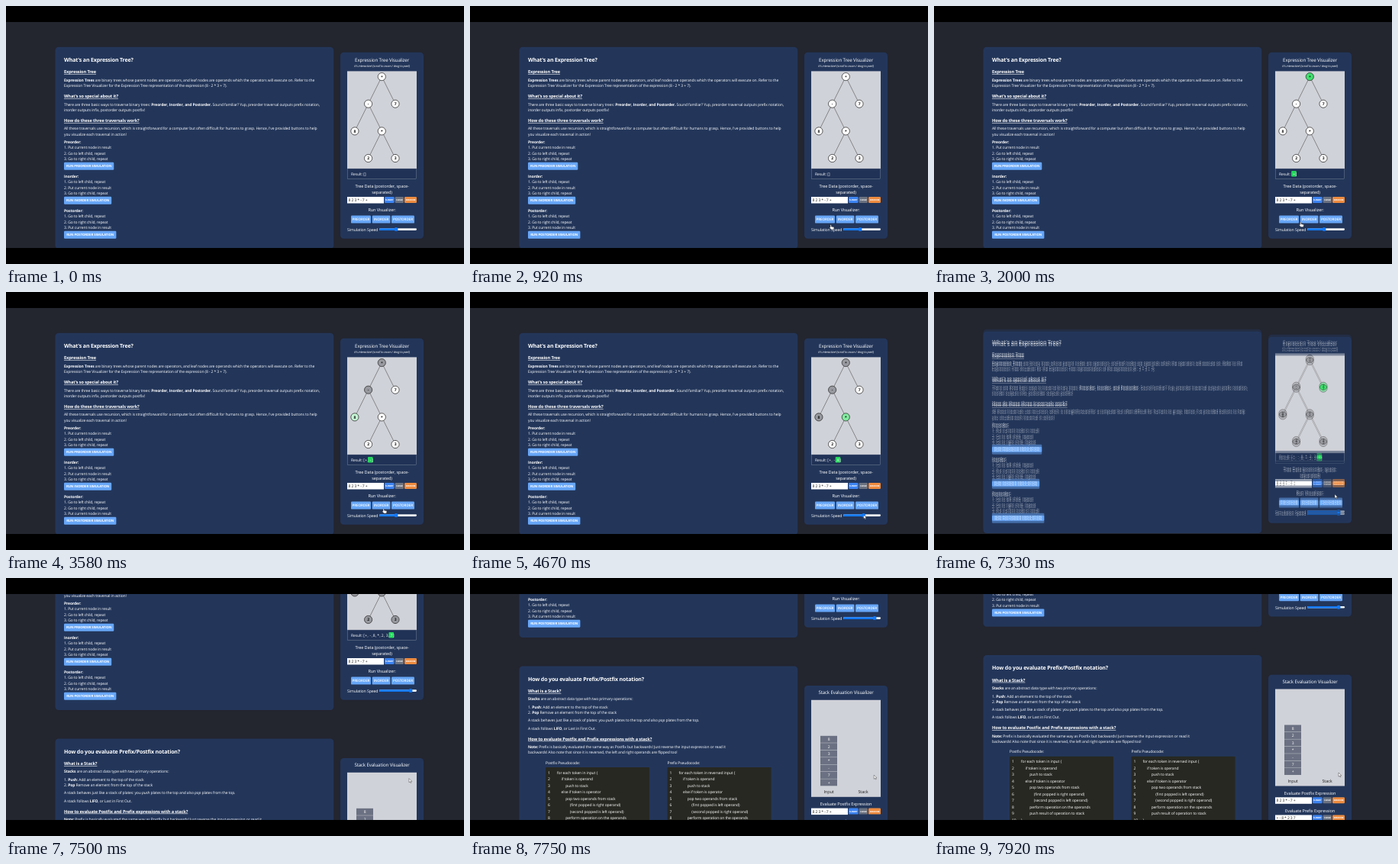
These frames come from a looping animation (600x338 px, 8000 ms). An HTML page:

```html
<!DOCTYPE html>
<html lang="en">
<head>
<meta charset="utf-8">
<title>Expression Tree Visualizer</title>
<style>
html, body { margin: 0; width: 100%; height: 100%; overflow: hidden; background: #000; }
svg { display: block; width: 600px; height: 338px; }
text { font-family: "Open Sans", "Noto Sans", sans-serif; font-size: 5px; letter-spacing: -.022em; fill: #fff; text-rendering: geometricPrecision; white-space: pre; }
.b { font-weight: 700; }
.i { font-style: italic; }
.mid { text-anchor: middle; }
.title { font-size: 7.05px; font-weight: 700; }
.head { font-size: 5.65px; font-weight: 700; text-decoration: underline; }
.panel { font-size: 6.2px; }
.label { font-size: 5.6px; }
.speed { font-size: 5.2px; }
.hint { font-size: 3.95px; font-style: italic; }
.run { font-size: 4.3px; font-weight: 700; }
.mode { font-size: 4.6px; font-weight: 600; }
.tiny { font-size: 2.8px; font-weight: 700; }
.dark { fill: #222; }
.node { font-weight: 700; fill: #111; }
.card { fill: #23365a; }
</style>
</head>
<body>
<svg viewBox="0 0 600 338">
  <defs><clipPath id="view"><rect y="21" width="600" height="296"/></clipPath></defs>
  <rect width="600" height="338"/>
  <g clip-path="url(#view)">
    <rect y="21" width="600" height="296" fill="#23252f"/>
    <g id="scroller"><g id="page"></g></g>
    <use id="ghost" href="#page" opacity=".5" visibility="hidden"/>
    <g id="cursor" stroke="#222" stroke-width=".4" fill="#fff" stroke-linejoin="round">
      <path id="arrow" d="M0 0V5.2L1.3 4.1L2.1 5.9L3 5.5L2.2 3.8H3.8Z"/>
      <path id="hand" d="M0 .5Q.7 -.4 1.3 .5V2.6L4.4 3.2Q5 3.4 4.9 4.3L4.3 6.6H1.2L-1.2 3.9Q-1.2 3 0 3.8Z"/>
    </g>
  </g>
</svg>
<script>
const LOOP = 8000, STEP = 1000 / 12;
const $ = id => document.getElementById(id);
const BLUE = '#67a6f7';

// All text is placed by its vertical centre.
const sizes = { title: 7.05, panel: 6.2, head: 5.65, label: 5.6, speed: 5.2, hint: 3.95, run: 4.3, mode: 4.6, tiny: 2.8 };
function text(x, y, str, cls = '') {
  const size = sizes[cls.split(' ')[0]] || 5;
  return `<text x="${x}" y="${y + size * .35}" class="${cls}">${str}</text>`;
}
const rect = (x, y, w, h, fill, r = 0, extra = '') =>
  `<rect x="${x}" y="${y}" width="${w}" height="${h}" rx="${r}" fill="${fill}" ${extra}/>`;
const card = (x, y, w, h) => `<rect class="card" x="${x}" y="${y}" width="${w}" height="${h}" rx="4.5"/>`;
const button = (x, y, w, h, str, cls, fill = BLUE) =>
  rect(x, y, w, h, fill, 1.2) + text(x + w / 2, y + h / 2, str, cls + ' mid');
const bold = s => `<tspan class="b">${s}</tspan>`;
const ital = s => `<tspan class="i">${s}</tspan>`;
const lines = rows => rows.map(([y, str, cls]) => text(76, y, str, cls)).join('');

function traversal(y, name, order, width) {
  return text(76, y, name + ':', 'b') +
    order.map((s, i) => text(76, y + 7.4 * (i + 1), `${i + 1}. ${s}`)).join('') +
    button(76, y + 26.8, width, 10, `RUN ${name.toUpperCase()} SIMULATION`, 'run');
}

function inputRow(y, value) {
  return rect(447, y, 48, 8.5, '#fff') + text(448.5, y + 4.2, value, 'dark') +
    button(496, y, 12.6, 8, 'SUBMIT', 'tiny', '#3d84f2') +
    button(509.6, y, 11.4, 8, 'CLEAR', 'tiny', '#6b7280') +
    button(522, y, 16, 8, 'RANDOM', 'tiny', '#ee8b3f');
}

function pseudocode(x, input, first, second) {
  const code = [[0, `for each token in ${input} {`], [1, 'if token is operand'], [2, 'push to stack'],
    [1, 'else if token is operator'], [2, 'pop two operands from stack'],
    [3, `(first popped is ${first} operand)`], [3, `(second popped is ${second} operand)`],
    [2, 'perform operation on the operands'], [2, 'push result of operation to stack'], [0, '}']];
  return rect(x, 488, 136, 96, '#272822', 1) + code.map(([depth, str], i) =>
    text(x + 3, 495 + 8.5 * i, i + 1) + text(x + 15 + 5.6 * depth, 495 + 8.5 * i, str)).join('');
}

// Nodes in preorder: symbol, position, parent, time of visit, place in the result.
const nodes = [
  ['+', 492.3, 92.6, -1, 1500, 471.5], ['-', 474.6, 128.2, 0, 2500, 477.3],
  ['8', 456.9, 163.9, 1, 3500, 482], ['*', 492.3, 163.9, 1, 4500, 487.6],
  ['2', 474.6, 199.5, 3, 5250, 493], ['3', 510, 199.5, 3, 5700, 499],
  ['7', 510, 128.2, 0, 6150, 504.8]];

const treeLines = nodes.map(([, x, y, parent]) => parent < 0 ? '' :
  `<path d="M${nodes[parent][1]} ${nodes[parent][2]}L${x} ${y}" stroke="#444" stroke-width=".55"/>`).join('');
const treeNodes = nodes.map(([symbol, x, y], i) =>
  `<circle id="node${i}" cx="${x}" cy="${y}" r="5.1" stroke="#2a2a2a" stroke-width=".75"/>` +
  text(x, y, symbol, 'node mid')).join('');
const resultItems = nodes.map(([symbol, , , , , x], i) =>
  `<g id="item${i}">${text(x, 220, symbol, 'mid')}<g id="comma${i}">${text(x + 2, 220, ',')}</g></g>`).join('');

const intro = card(64.5, 53.8, 364.7, 264.2) + lines([
  [70.9, 'What\'s an Expression Tree?', 'title'],
  [86, 'Expression Tree', 'head'],
  [97, bold('Expression Trees') + ' are binary trees whose parent nodes are operators, and leaf nodes are operands which the operators will execute on. Refer to the'],
  [104.2, 'Expression Tree Visualizer for the Expression Tree representation of the expression (8 - 2 * 3 + 7).'],
  [118, 'What\'s so special about it?', 'head'],
  [128.8, 'There are three basic ways to traverse binary trees: ' + bold('Preorder, Inorder, and Postorder.') + ' Sound familiar? Yup, preorder traversal outputs prefix notation,'],
  [136, 'inorder outputs infix, postorder outputs postfix!'],
  [150, 'How do these three traversals work?', 'head'],
  [160.7, 'All these traversals use recursion, which is straightforward for a computer but often difficult for humans to grasp. Hence, I\'ve provided buttons to help'],
  [168, 'you visualize each traversal in action!']]) +
  traversal(178, 'Preorder', ['Put current node in result', 'Go to left child, repeat', 'Go to right child, repeat'], 65.3) +
  traversal(223, 'Inorder', ['Go to left child, repeat', 'Put current node in result', 'Go to right child, repeat'], 62.2) +
  traversal(268, 'Postorder', ['Go to left child, repeat', 'Go to right child, repeat', 'Put current node in result'], 68.4);

const treePanel = card(438, 60.8, 109, 244) +
  text(492.6, 70.7, 'Expression Tree Visualizer', 'panel mid') +
  text(492.6, 78.4, 'It\'s interactive! (scroll to zoom / drag to pan!)', 'hint mid') +
  rect(447, 85.4, 91, 127.6, '#d0d2d9') + treeLines + treeNodes +
  rect(447.2, 213, 90.6, 13.6, '#203256', 0, 'stroke="#8e98a9" stroke-width=".4"') +
  text(452, 220, 'Result: [') + rect(0, 216, 6.6, 7.6, '#22d65b', 1, 'id="mark"') + resultItems +
  `<g id="close">${text(0, 220, ']')}</g>` +
  text(492.6, 235.7, 'Tree Data (postorder, space-', 'label mid') + text(492.6, 244, 'separated)', 'label mid') +
  inputRow(250, '8 2 3 * - 7 +') +
  text(492.6, 267.3, 'Run Visualizer:', 'label mid') +
  button(452, 274.6, 26, 10, 'PREORDER', 'mode') + button(479.7, 274.6, 23.8, 10, 'INORDER', 'mode') +
  button(505, 274.6, 30, 10, 'POSTORDER', 'mode') +
  text(447, 293, 'Simulation Speed', 'speed') +
  rect(489, 291.3, 49, 2.6, '#f1f3f5', 1.3) + rect(489, 291.3, 22, 2.6, '#1479f5', 1.3, 'id="fill"') +
  '<circle id="thumb" cy="292.6" r="2.5" fill="#1479f5"/>';

const stackText = card(64.5, 355.4, 364.7, 300) + lines([
  [372.2, 'How do you evaluate Prefix/Postfix notation?', 'title'],
  [388, 'What is a Stack?', 'head'],
  [398.7, bold('Stacks') + ' are an abstract data type with two primary operations:'],
  [409.2, '1. ' + bold('Push') + ': Add an element to the top of the stack'],
  [416.6, '2. ' + bold('Pop') + ' Remove an element from the top of the stack'],
  [426.6, `A stack behaves just like a stack of plates: you ${ital('push')} plates to the top and also ${ital('pop')} plates from the top.`],
  [437, 'A stack follows ' + bold('LIFO') + ', or Last in First Out.'],
  [450.6, 'How to evaluate Postfix and Prefix expressions with a stack?', 'head'],
  [461.2, bold('Note:') + ' Prefix is basically evaluated the same way as Postfix but backwards! Just reverse the input expression or read it'],
  [468.5, 'backwards! Also note that since it is reversed, the left and right operands are flipped too!']]) +
  text(99, 481.8, 'Postfix Pseudocode:') + text(258.5, 481.8, 'Prefix Pseudocode:') +
  pseudocode(99, 'input', 'right', 'left') + pseudocode(258.5, 'reversed input', 'left', 'right');

const stackPanel = card(438, 381, 109, 300) +
  text(492.6, 390.2, 'Stack Evaluation Visualizer', 'panel mid') +
  rect(447, 399.8, 91, 127, '#d0d2d9') +
  [...'823*-7+'].map((c, i) => rect(459, 446.8 + 9.42 * i, 22, 9, '#6b7182') +
    text(470, 451.4 + 9.42 * i, c, 'mid')).join('') +
  text(470, 520, 'Input', 'label mid dark') + text(515, 520, 'Stack', 'label mid dark') +
  text(492.6, 536, 'Evaluate Postfix Expression', 'label mid') + inputRow(541.6, '8 2 3 * - 7 +') +
  text(492.6, 559.2, 'Evaluate Prefix Expression', 'label mid') + inputRow(564.8, '+ - 8 * 2 3 7');

$('page').innerHTML = intro + treePanel + stackText + stackPanel;

// Tracks of [time, value, ...], joined by straight lines.
const scrollTrack = [[7250, 0], [7330, 2], [7420, 70], [7500, 145], [7580, 190], [7670, 222], [7750, 240], [7830, 249.5], [7920, 254.3]];
const speedTrack = [[4500, 511], [5200, 530]];
const cursorTrack = [[160, 505, 322], [800, 476, 290], [1100, 466, 281], [1500, 468, 281], [2000, 479.5, 283],
  [3580, 494, 283.5], [4300, 511, 292], [4500, 511, 292], [5200, 530, 292], [5830, 526.5, 298.8],
  [7330, 525, 265], [7500, 528, 262.6], [7920, 530, 255]];

const clamp = v => Math.max(0, Math.min(1, v));
function sample(track, t) {
  const i = track.findIndex(key => key[0] > t);
  if (i === 0) return track[0].slice(1);
  if (i < 0) return track[track.length - 1].slice(1);
  const a = track[i - 1], b = track[i], p = (t - a[0]) / (b[0] - a[0]);
  return a.slice(1).map((v, k) => v + (b[k + 1] - v) * p);
}
const mix = (a, b, p) => `rgb(${a.map((v, k) => Math.round(v + (b[k] - v) * p))})`;
const show = (id, on) => $(id).setAttribute('visibility', on ? 'inherit' : 'hidden');
const move = (id, x, y) => $(id).setAttribute('transform', `translate(${x} ${y})`);
const WHITE = [255, 255, 255], GREEN = [62, 224, 108], GRAY = [151, 153, 159];

function draw(t) {
  let last = -1;
  nodes.forEach(([, , , , start], i) => {
    const next = nodes[i + 1] ? nodes[i + 1][4] : Infinity;
    const color = t < next - 100 ? mix(WHITE, GREEN, clamp((t - start) / 260))
      : mix(GREEN, GRAY, clamp((t - next + 100) / 150));
    $('node' + i).setAttribute('fill', color);
    if (t >= start + 200) last = i;
  });
  nodes.forEach((_, i) => { show('item' + i, i <= last); show('comma' + i, i < last); });
  const markX = last < 0 ? 0 : nodes[last][5];
  show('mark', last >= 0);
  $('mark').setAttribute('x', markX - 3.3);
  move('close', last < 0 ? 470 : markX + 2.2, 0);

  const [speed] = sample(speedTrack, t);
  $('thumb').setAttribute('cx', speed);
  $('fill').setAttribute('width', speed - 489);

  const [scroll] = sample(scrollTrack, t);
  move('scroller', 0, -scroll);
  // The first moment of scrolling is smeared.
  show('ghost', scroll > 0 && scroll < 20);
  move('ghost', 0, -scroll - 3);

  const [x, y] = sample(cursorTrack, t);
  const pointing = t > 900 && t < 4000;
  move('cursor', x, y);
  show('hand', pointing);
  show('arrow', !pointing);
}

// Twelve pictures a second, each starting on a whole hundredth.
function tick() {
  const t = performance.now() % LOOP;
  const step = Math.floor((t + 3.4) / STEP) % 96;
  draw(Math.round(step * STEP / 10) * 10);
  requestAnimationFrame(tick);
}
tick();
</script>
</body>
</html>
```
